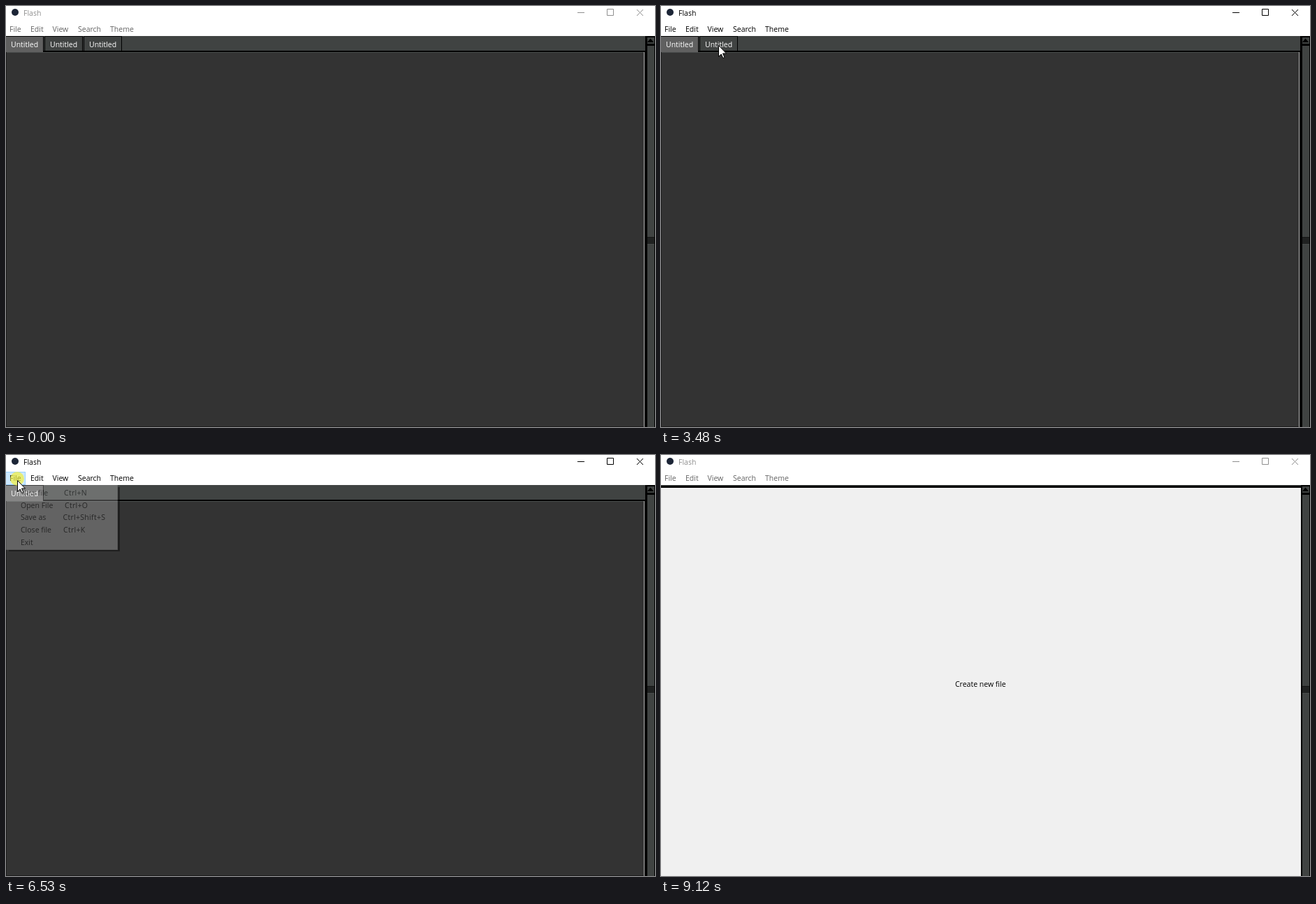
Animation of 929x603 px, one loop 9.2 s. Source, as an HTML page:

```html
<!DOCTYPE html>
<html lang="en">
<head>
<meta charset="utf-8">
<title>Text editor</title>
<style>
  html, body { margin: 0; width: 100%; height: 100%; overflow: hidden; background: #fff; }
  svg { display: block; width: 100%; height: 100%; }
  text { font: 10.5px "Open Sans", "Noto Sans", sans-serif; white-space: pre; }
  .keys { letter-spacing: .3px; }
</style>
</head>
<body>
<svg id="stage" viewBox="0 0 929 603"></svg>
<script>
const LOOP = 9200;
const NS = 'http://www.w3.org/2000/svg';
const stage = document.getElementById('stage');

function add(parent, tag, attrs = {}, label) {
  const el = document.createElementNS(NS, tag);
  for (const k in attrs) el.setAttribute(k, attrs[k]);
  if (label) el.textContent = label;
  parent.appendChild(el);
  return el;
}
const group = (parent = stage) => add(parent, 'g');
const rect = (p, x, y, width, height, fill) =>
  add(p, 'rect', { x, y, width, height, fill, 'shape-rendering': 'crispEdges' });
const text = (p, x, y, label, fill) => add(p, 'text', { x, y, fill }, label);
const set = (el, k, v) => el.setAttribute(k, v);
const show = (el, on) => { el.style.display = on ? '' : 'none'; };
const clamp = v => Math.max(0, Math.min(1, v));

// Title bar and menu bar
rect(stage, 0, 0, 929, 43, '#fff');
add(stage, 'circle', { cx: 13, cy: 9, r: 5, fill: '#1c2536' });
const title = text(stage, 25, 14, 'Flash');
const controls = add(stage, 'path', {
  d: 'M818 9.5h10M860.5 4.5h9v9h-9zM903 5l9 9m0 -9l-9 9', fill: 'none'
});
const fileMark = group();
rect(fileMark, 0, 24, 28, 19, '#99d1ff');
rect(fileMark, 0, 25, 27, 17, '#cce8ff');
const bar = group();
[['File', 5], ['Edit', 35], ['View', 66.5], ['Search', 103], ['Theme', 149]]
  .forEach(([label, x]) => text(bar, x, 37, label));

// Empty view
const empty = group();
rect(empty, 0, 43, 916, 560, '#f0f0f0');
rect(empty, 0, 43, 916, 4, '#000');
rect(empty, 0, 43, 916, 1, '#404342');

// Editor with tabs
const editor = group();
rect(editor, 0, 43, 916, 560, '#000');
rect(editor, 0, 43, 915, 21, '#404342');
rect(editor, 0, 66, 914, 537, '#1c1c1c');
rect(editor, 1, 66, 912, 1, '#4a4d4c');
rect(editor, 1, 67, 912, 535, '#333');
rect(editor, 913, 66, 1, 537, '#b4b4b4');
const tabs = [0, 1, 2].map(i => {
  const g = group(editor), x = 56 * i - 1;
  rect(g, x, 43, 55, 22, '#000');
  const face = rect(g, x + 1, 44, 53, 20);
  text(g, x + 8, 59, 'Untitled', '#fff');
  return { g, face };
});
const caret = rect(editor, 2, 68, 1, 17, '#fff');
text(empty, 421, 331.5, 'Create new file', '#000');

// Scrollbar
rect(stage, 916, 43, 13, 560, '#000');
rect(stage, 918, 45, 10, 9, '#404342');
add(stage, 'path', { d: 'M918 52l4.5 -5.5l4.5 5.5z', fill: '#000' });
rect(stage, 918, 57, 10, 546, '#404342');
for (let y = 331; y < 340; y += 2) rect(stage, 918, y, 10, 1, '#000');

// File menu
const ROW = 17.7, TOP = 45, PICK = 3;
const entries = [['New file', 'Ctrl+N', 83], ['Open File', 'Ctrl+O', 84],
  ['Save as', 'Ctrl+Shift+S', 81.5], ['Close file', 'Ctrl+K', 82], ['Exit']];
function entry(parent, i, fill) {
  const [label, keys, x] = entries[i], y = 58 + ROW * i;
  text(parent, 21, y, label, fill);
  if (keys) set(text(parent, x, y, keys, fill), 'class', 'keys');
}
const shadow = add(stage, 'path', { d: 'M160 46h3v92H4v-2h156z', opacity: .4 });
const menu = group();
rect(menu, 0, 43, 160, 93, '#ccc');
rect(menu, 0, 43, 159, 92, '#f0f0f0');
const marks = entries.map((e, i) => {
  entry(menu, i, '#000');
  const g = group();
  rect(g, 1, Math.round(TOP + ROW * i), 157, 18, '#0078d7');
  entry(g, i, '#fff');
  return g;
});

// Pointer shapes
const spot = add(stage, 'circle', { r: 10, fill: '#f2f03c', opacity: .7 });
const arrow = add(stage, 'path', {
  d: 'M.5 .5V16.5L4.2 13L6.8 18.6L9 17.6L6.5 12H11.5Z', fill: '#fff', stroke: '#000'
});
const beam = add(stage, 'path', {
  d: 'M-3 -7h2l1 1l1 -1h2M0 -6v12M-3 7h2l1 -1l1 1h2', fill: 'none', stroke: '#ccc'
});

// Each round opens the menu, points at "Close file" and closes one tab
const rounds = [
  { open: 1940, aim: 2600, close: 2640 },
  { open: 4880, aim: 5400, close: 5580 },
  { open: 6480, aim: 7090, close: 7240 }
];
const FADE = 200, SWITCH = 3800;
const place = (x, y) => ({ x, y });
const TITLE = place(33, 10), FILE = place(16, 36), ITEM = place(38, 109), TAB = place(84, 54);

const route = [];
const go = (to, start, end) => route.push({ to, start, end });
go(place(849, 600), 0, 0);
go(place(774, 482), 220, 400);
go(place(32, 78), 710, 1230);
go(place(94, 34), 1230, 1490);
go(TITLE, 1490, 1540);
for (const { open, aim } of rounds) {
  go(FILE, open - 220, open - 30);
  go(ITEM, aim - 200, aim);
}
go(TAB, 2950, 3550);
go(TITLE, SWITCH + 100, 4440);
go(TITLE, 5650, 6000);
go(place(676, 389), 7400, 8130);
go(place(888, 604), 8160, 8730);
route.sort((a, b) => a.start - b.start);

const within = (t, from, to) => t >= from && t < to;
const pressed = t => within(t, SWITCH - 20, SWITCH + 60) ||
  rounds.some(r => within(t, r.open - 30, r.open + 70) || within(t, r.close - 30, r.close));

function pointer(t) {
  if (!within(t, 220, 8730) || within(t, 1230, 1490)) return null;
  const i = route.filter(leg => leg.start <= t).length - 1;
  const from = route[i - 1].to, { to, start, end } = route[i];
  const u = clamp((t - start) / (end - start)), e = u * u * (3 - 2 * u);
  const mix = k => Math.round(from[k] + (to[k] - from[k]) * e);
  return place(mix('x'), mix('y'));
}

function draw(t) {
  const p = pointer(t);
  const focused = within(t, rounds[0].open, 9120);
  const opened = rounds.find(r => within(t, r.open, r.close));
  const picked = rounds.find(r => within(t, r.close, r.close + FADE));
  const count = rounds.filter(r => t < r.close).length;
  const active = within(t, SWITCH, rounds[1].close) ? 1 : 0;

  set(title, 'fill', focused ? '#000' : '#8f8f8f');
  set(bar, 'fill', focused ? '#000' : '#646464');
  set(controls, 'stroke', focused ? '#000' : '#8f8f8f');
  show(fileMark, opened);

  show(editor, count);
  show(empty, !count);
  tabs.forEach(({ g, face }, i) => {
    show(g, i < count);
    set(face, 'fill', i === active ? '#606060' : '#404342');
    set(face, 'height', i === active ? 22 : 20);
  });
  show(caret, active && (t - 3450) % 900 < 600);

  const alpha = opened ? clamp((t - opened.open) / FADE) : 0;
  set(menu, 'opacity', alpha);
  show(shadow, opened);
  const hover = opened && p.y >= TOP ? Math.floor((p.y - TOP) / ROW) : -1;
  marks.forEach((g, i) => {
    const fading = picked && i === PICK ? 1 - (t - picked.close) / FADE : 0;
    set(g, 'opacity', i === hover ? alpha : fading);
  });

  const isBeam = p && count && !opened && p.y > 66;
  show(arrow, p && !isBeam);
  show(beam, isBeam);
  show(spot, pressed(t));
  if (!p) return;
  set(arrow, 'transform', `translate(${p.x} ${p.y})`);
  set(beam, 'transform', `translate(${p.x + .5} ${p.y + .5})`);
  set(spot, 'transform', `translate(${p.x} ${p.y - 2})`);
}

const start = performance.now();
function tick() {
  draw((performance.now() - start) % LOOP);
  requestAnimationFrame(tick);
}
tick();
</script>
</body>
</html>
```
